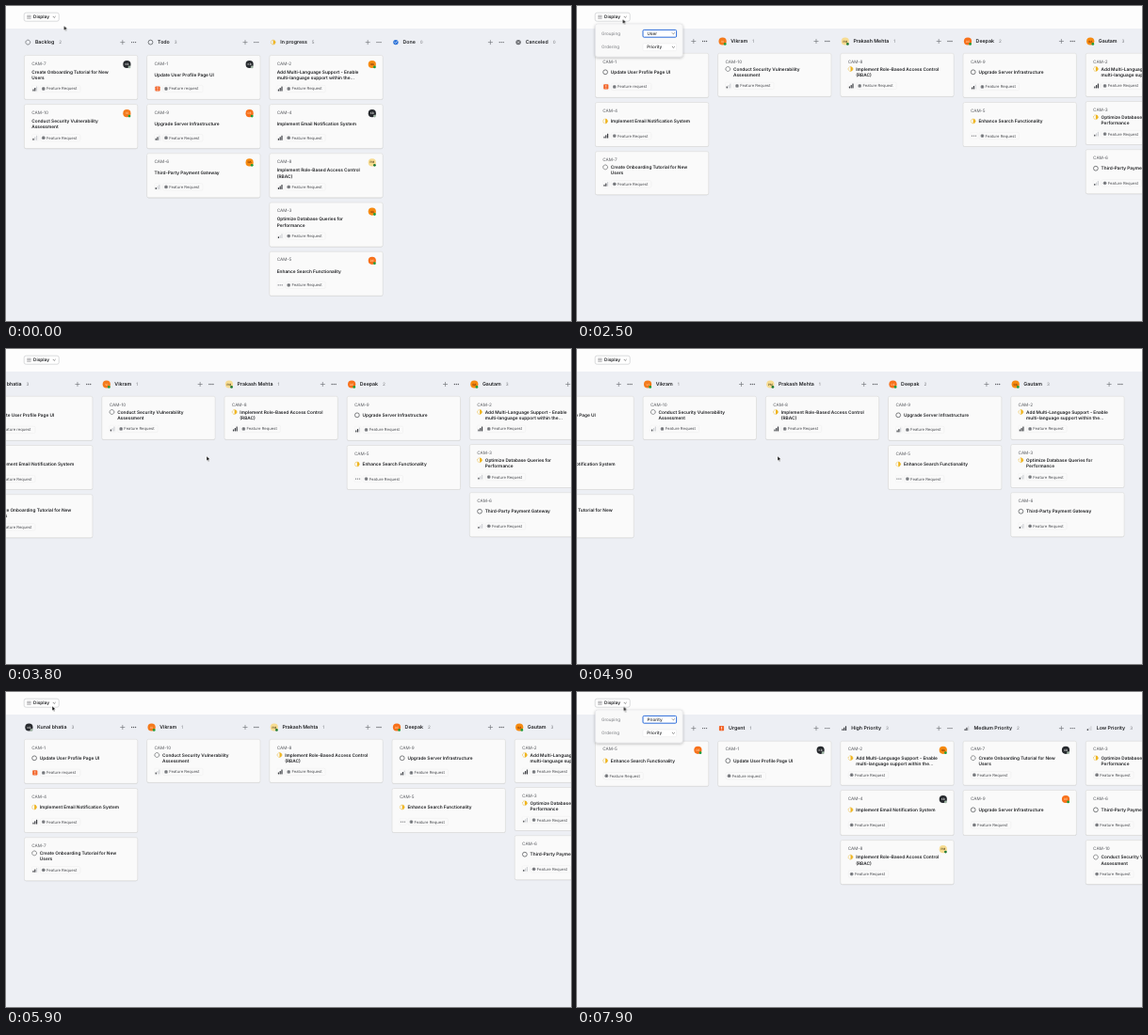
These frames come from a looping animation (600x335 px, 8000 ms). An HTML page:

```html
<!DOCTYPE html>
<html lang="en">
<head>
<meta charset="utf-8">
<title>Issue board</title>
<style>
html, body { margin: 0; width: 100%; height: 100%; overflow: hidden; background: #edeff4; }
svg { display: block; width: 100vw; height: 100vh; }
text { font-family: Inter, "Liberation Sans", sans-serif; text-rendering: geometricPrecision; white-space: pre; }

/* hard switches */
#status, #users, #priority, #popover, #ring, #val0, #val1, #val2, #menu0, #menu1, .mark0, .mark1 {
  animation: 8s step-end infinite;
}
#status   { animation-name: status; }
#users    { animation-name: users; }
#priority { animation-name: priority; }
#popover  { animation-name: popover; }
#ring     { animation-name: ring; }
#val0     { animation-name: val0; }
#val1     { animation-name: val1; }
#val2     { animation-name: val2; }
#menu0    { animation-name: menu0; }
#menu1    { animation-name: menu1; }
.mark0    { animation-name: mark0; }
.mark1    { animation-name: mark1; }

@keyframes status   { 0% { visibility: visible } 31.05%, 100% { visibility: hidden } }
@keyframes users    { 0% { visibility: hidden } 31.05% { visibility: visible } 93.55%, 100% { visibility: hidden } }
@keyframes priority { 0% { visibility: hidden } 93.55%, 100% { visibility: visible } }
@keyframes popover  { 0% { opacity: 0 } 4.8% { opacity: 1 } 33.55% { opacity: 0 } 77.3%, 100% { opacity: 1 } }
@keyframes ring     { 0% { opacity: 0 } 19.8% { opacity: 1 } 33.55% { opacity: 0 } 86.05%, 100% { opacity: 1 } }
@keyframes val0     { 0% { opacity: 1 } 26.05%, 100% { opacity: 0 } }
@keyframes val1     { 0% { opacity: 0 } 26.05% { opacity: 1 } 89.8%, 100% { opacity: 0 } }
@keyframes val2     { 0% { opacity: 0 } 89.8%, 100% { opacity: 1 } }
@keyframes menu0    { 0% { opacity: 0 } 19.8% { opacity: 1 } 26.05%, 100% { opacity: 0 } }
@keyframes menu1    { 0% { opacity: 0 } 86.05% { opacity: 1 } 89.8%, 100% { opacity: 0 } }
@keyframes mark0    { 0% { transform: none } 23.55%, 100% { transform: translateY(7.6px) } }
@keyframes mark1    { 0% { transform: none } 88.55%, 100% { transform: translateY(7.6px) } }

/* movement */
#scroll { animation: scroll 8s linear infinite; }
@keyframes scroll {
  0%, 43.75% { transform: translateX(0) }
  50% { transform: translateX(-79.5px) }
  61.25% { transform: translateX(-79.5px); animation-timing-function: ease-in-out }
  65%, 100% { transform: translateX(0) }
}
#cursor { animation: cursor 8s ease-in-out infinite; }
@keyframes cursor {
  0%, 1.25%       { transform: translate(61.5px, 21px) }
  5%, 10%         { transform: translate(51px, 12px) }
  17.5%, 22.5%    { transform: translate(81.5px, 27px) }
  25%, 26.25%     { transform: translate(80px, 36px); animation-timing-function: linear }
  30%             { transform: translate(54px, 21px) }
  31.25%, 33.75%  { transform: translate(48.5px, 14px) }
  40%, 66.25%     { transform: translate(213px, 114px) }
  73.75%, 77.5%   { transform: translate(49px, 15px) }
  81.25%, 82.5%   { transform: translate(64px, 17px) }
  85%, 87.5%      { transform: translate(82px, 28px) }
  88.75%, 91.5%   { transform: translate(82px, 36px) }
  98.75%, 100%    { transform: translate(49.5px, 15.5px) }
}
</style>
</head>
<body>
<svg id="stage" viewBox="0 0 600 335" preserveAspectRatio="none"></svg>
<script>
const INK = '#1f2023', GREY = '#77797e', LINE = '#dadad8';

const text = (x, y, size, weight, fill, s) =>
  `<text x="${x}" y="${y + size * 0.35}" font-size="${size}" font-weight="${weight}" fill="${fill}">${s}</text>`;
const box = (x, y, w, h, r, fill, stroke = 'none', sw = 0.5) =>
  `<rect x="${x}" y="${y}" width="${w}" height="${h}" rx="${r}" fill="${fill}" stroke="${stroke}" stroke-width="${sw}"/>`;
const dot = (x, y, r, fill) => `<circle cx="${x}" cy="${y}" r="${r}" fill="${fill}"/>`;
const path = (d, stroke, sw = 0.6, fill = 'none') =>
  `<path d="${d}" fill="${fill}" stroke="${stroke}" stroke-width="${sw}" stroke-linecap="round" stroke-linejoin="round"/>`;
const dots = (x, y, fill) => [-2, 0, 2].map(d => dot(x + d, y, 0.65, fill)).join('');
const chevron = (x, y) => path(`M${x - 1.2} ${y - 0.6}l1.2 1.2l1.2 -1.2`, '#444', 0.6);

const users = {
  kb: { name: 'Kunal bhatia', bg: '#26292d', fg: '#e8e8e8', on: '#9db3a2' },
  vi: { name: 'Vikram', bg: '#f47a1c', fg: '#ffd9b0', on: '#1f9d3a' },
  pm: { name: 'Prakash Mehta', bg: '#f7dc92', fg: '#4a3c14', on: '#1f7a35' },
  de: { name: 'Deepak', bg: '#f8701a', fg: '#ffd9b0', on: '#1f9d3a' },
  ga: { name: 'Gautam', bg: '#f68a10', fg: '#6a2a08', on: '#1f9d3a' }
};

// id: title lines, user, status, priority
const issues = {
  1: [['Update User Profile Page UI'], 'kb', 'todo', 'urgent'],
  2: [['Add Multi-Language Support - Enable', 'multi-language support within the...'], 'ga', 'progress', 3],
  3: [['Optimize Database Queries for', 'Performance'], 'ga', 'progress', 1],
  4: [['Implement Email Notification System'], 'kb', 'progress', 3],
  5: [['Enhance Search Functionality'], 'de', 'progress', 0],
  6: [['Third-Party Payment Gateway'], 'ga', 'todo', 1],
  7: [['Create Onboarding Tutorial for New', 'Users'], 'kb', 'backlog', 2],
  8: [['Implement Role-Based Access Control', '(RBAC)'], 'pm', 'progress', 3],
  9: [['Upgrade Server Infrastructure'], 'de', 'todo', 2],
  10: [['Conduct Security Vulnerability', 'Assessment'], 'vi', 'backlog', 1]
};

function avatar(x, y, key) {
  const u = users[key];
  return dot(x, y, 4.1, u.bg) +
    `<text x="${x}" y="${y + 1}" font-size="3" font-weight="500" text-anchor="middle" fill="${u.fg}">${key.toUpperCase()}</text>` +
    dot(x + 2.6, y + 2.9, 1.4, u.on);
}

function statusIcon(x, y, kind) {
  const ring = (c, dash = '') =>
    `<circle cx="${x}" cy="${y}" r="2.4" fill="none" stroke="${c}" stroke-width=".7" stroke-dasharray="${dash}"/>`;
  if (kind === 'progress')
    return ring('#e9b222', '.9 .5') + `<path d="M${x} ${y - 2.4}a2.4 2.4 0 0 1 0 4.8z" fill="#efb41e"/>`;
  if (kind === 'done')
    return dot(x, y, 2.7, '#2f74d8') + path(`M${x - 1.2} ${y}l.9 .9l1.6 -1.8`, '#fff');
  if (kind === 'canceled')
    return dot(x, y, 2.7, '#66686d') + path(`M${x - 0.9} ${y - 0.9}l1.8 1.8m0 -1.8l-1.8 1.8`, '#fff');
  return ring('#4a4c50', kind === 'backlog' ? '1.2 .2' : '');
}

function prioIcon(x, y, p) {
  if (p === 'urgent')
    return box(x - 2.6, y - 2.6, 5.2, 5.2, 0.8, '#f2652a') + path(`M${x} ${y - 1.4}v1.5m0 1.2v.1`, '#fff', 0.7);
  if (p === 0) return dots(x, y, '#66686d');
  return [0, 1, 2].map(i =>
    box(x - 2.4 + i * 1.8, y + 0.6 - i * 1.5, 1.2, 1.9 + i * 1.5, 0.3, i < p ? '#3c3e43' : '#cfd1d5')).join('');
}

function card(x, y, h, id, v) {
  const [lines, user, status, prio] = issues[id];
  const tx = x + (v.icon ? 16.7 : 8.2);
  const ty = y + (lines.length > 1 ? v.t2 : v.t1);
  const ly = y + h - v.foot;
  const lx = x + (v.prio ? 20.7 : 12.2);
  const label = id === 1 ? 'Feature request' : 'Feature Request';
  return box(x + 0.3, y + 0.6, 120.4, h, 1.8, '#d3d5d9') +
    box(x + 0.3, y, 120.4, h, 1.8, '#fafafa', LINE, 0.6) +
    text(x + 8.2, y + 8.6, 4.65, 400, '#55575c', 'CAM-' + id) +
    lines.map((s, i) => text(tx, ty + i * 6.4, 4.75, 600, INK, s)).join('') +
    (v.icon ? statusIcon(x + 11, ty, status) : '') +
    (v.avatar ? avatar(x + 109.3, y + 9.6, user) : '') +
    (v.prio ? box(x + 8.3, ly - 3.7, 7.2, 7.4, 1.2, 'none', '#f0f0f0') + prioIcon(x + 11.7, ly, prio) : '') +
    box(lx - 3.4, ly - 3.7, 42.4, 7.4, 1.3, 'none', '#ececec') +
    dot(lx, ly, 1.9, '#8b8d91') + dot(lx, ly, 0.7, '#55575c') +
    text(lx + 3.2, ly, 4.2, 400, '#4a4c50', label);
}

function column(i, [icon, name, ids], v) {
  const x = 19.1 + i * 130.2, hy = v.head;
  let y = v.top;
  let out = icon(x, hy) +
    `<text x="${x + v.nameX}" y="${hy + 1.85}" font-size="5.25" font-weight="600" fill="${INK}">${name}` +
    `<tspan dx="5" font-size="4.6" font-weight="400" fill="${GREY}">${ids.length}</tspan></text>` +
    path(`M${x + 102.6} ${hy}h4.2m-2.1 -2.1v4.2`, '#66686d', 0.6) + dots(x + 116.5, hy, '#55575c');
  for (const id of ids) {
    const h = issues[id][0].length > 1 ? v.h2 : v.h1;
    out += card(x, y, h, id, v);
    y += h + 5.2;
  }
  return out;
}

const view = (id, v, cols) => `<g id="${id}">${cols.map((c, i) => column(i, c, v)).join('')}</g>`;
const st = kind => (x, y) => statusIcon(x + 4.2, y, kind);
const pr = p => (x, y) => prioIcon(x + 4.2, y, p);
const person = (key, ids) => [(x, y) => avatar(x + 5.3, y, key), users[key].name, ids];

const statusView = view('status',
  { head: 38.6, nameX: 11.8, top: 52.4, h1: 47, h2: 47, t1: 20.7, t2: 17.7, foot: 11.4, avatar: 1, prio: 1 }, [
    [st('backlog'), 'Backlog', [7, 10]],
    [st('todo'), 'Todo', [1, 9, 6]],
    [st('progress'), 'In progress', [2, 4, 8, 3, 5]],
    [st('done'), 'Done', []],
    [st('canceled'), 'Canceled', []]
  ]);
const userView = view('users',
  { head: 37.5, nameX: 13.9, top: 50.3, h1: 47, h2: 46, t1: 20, t2: 16.7, foot: 11.4, icon: 1, prio: 1 }, [
    person('kb', [1, 4, 7]),
    person('vi', [10]),
    person('pm', [8]),
    person('de', [9, 5]),
    person('ga', [2, 3, 6])
  ]);
const prioView = view('priority',
  { head: 38.6, nameX: 11.8, top: 52.2, h1: 48, h2: 47, t1: 20.9, t2: 18, foot: 11, icon: 1, avatar: 1 }, [
    [pr(0), 'No Priority', [5]],
    [pr('urgent'), 'Urgent', [1]],
    [pr(3), 'High Priority', [2, 4, 8]],
    [pr(2), 'Medium Priority', [7, 9]],
    [pr(1), 'Low Priority', [3, 6, 10]]
  ]);

const options = ['Status', 'User', 'Priority'];

function menu(n) {
  const y = 24 - n * 7.6;
  return `<g id="menu${n}"><g filter="url(#soft)">${box(67, y, 37, 27, 2.2, '#4b4c4f', '#68696c', 0.4)}</g>` +
    `<g class="mark${n}">${box(68.6, y + 2 + n * 7.6, 33.8, 7.6, 1.3, '#3f7fe6')}</g>` +
    options.map((s, i) => text(75, y + 5.9 + i * 7.6, 4.6, 500, '#f4f4f4', s)).join('') +
    path(`M71 ${y + 5.9 + n * 7.6}l1 1.1l1.7 -2.4`, '#fff') + '</g>';
}

const topBar = box(0, 0, 600, 24, 0, '#fdfdfd') +
  box(19.2, 7.2, 37, 9, 2, '#fff', '#c2c3c6', 0.6) +
  path('M22.6 10.2h3.6m-3.6 1.5h3.6m-3.6 1.5h3.6', '#55575c', 0.5) +
  text(29, 11.7, 4.75, 600, INK, 'Display') + chevron(51.2, 11.8);

const popover = `<g id="popover"><g filter="url(#soft)">${box(19.4, 19, 92.8, 35, 2.5, '#f9f9f9', '#dcdde0', 0.5)}</g>` +
  text(26, 29.3, 4.6, 400, GREY, 'Grouping') + text(26, 43.8, 4.6, 400, GREY, 'Ordering') +
  box(70, 25.4, 35.6, 7.8, 1.2, '#fff', '#e6e7e9') + box(70, 39.9, 35.6, 7.8, 1.2, '#fff', '#e6e7e9') +
  `<g id="ring">${box(70, 25.4, 35.6, 7.8, 1.2, 'none', '#2f6fdc', 1)}</g>` +
  options.map((s, i) => `<g id="val${i}">${text(74.6, 29.3, 4.6, 500, INK, s)}</g>`).join('') +
  text(74.2, 43.8, 4.6, 500, INK, 'Priority') + chevron(102.4, 29.3) + chevron(102.4, 43.8) + '</g>';

const cursor = `<g id="cursor">${path('M0 0v5l1.2 -1.1l.8 1.8l.9 -.4l-.8 -1.7h1.6z', '#fff', 0.5, '#111')}</g>`;

document.getElementById('stage').innerHTML =
  `<defs><filter id="soft" x="-20%" y="-30%" width="140%" height="170%">
    <feDropShadow dx="0" dy="1" stdDeviation="1.6" flood-color="#000" flood-opacity=".28"/></filter></defs>` +
  box(0, 0, 600, 335, 0, '#edeff4') + topBar + statusView +
  `<g id="scroll">${userView}</g>` + prioView + popover + menu(0) + menu(1) + cursor;
</script>
</body>
</html>
```
